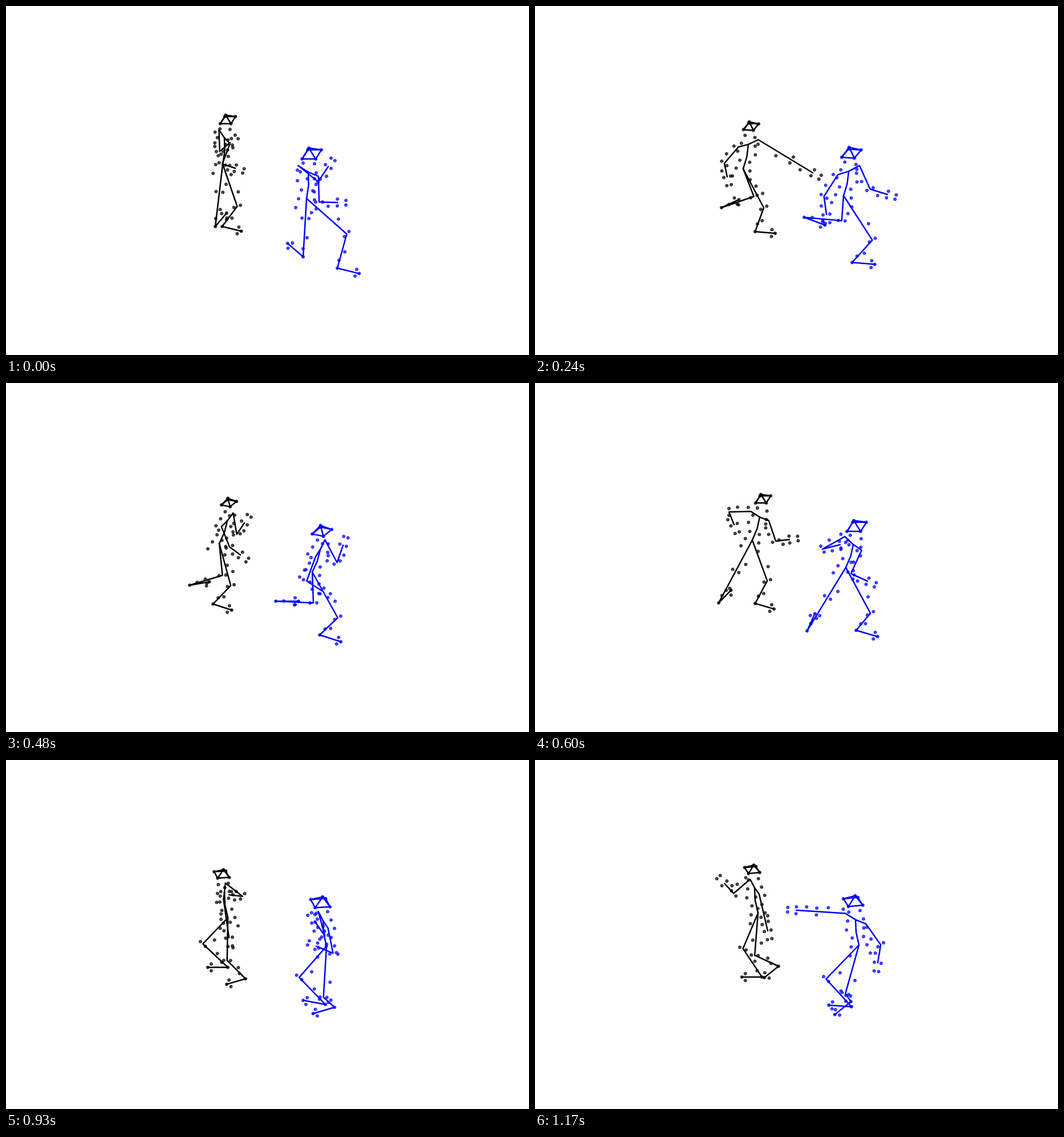
Animation of 917 by 611 pixels, one loop 1200 ms. Source, as an HTML page with a canvas:

```html
<!DOCTYPE html>
<html>
<head>
<meta charset="utf-8">
<title>Two moving skeletons</title>
<style>
html, body { margin: 0; width: 100%; height: 100%; overflow: hidden; background: #fefefe; }
canvas { display: block; }
</style>
</head>
<body>
<canvas id="stage" width="917" height="611"></canvas>
<script>
const ctx = document.getElementById('stage').getContext('2d');
const LOOP = 1200, STEP = 30;
const times = [0, 240, 480, 600, 780, 930, 1170];
const LAST = times.length - 1;

const clamp = (v, lo, hi) => Math.max(lo, Math.min(hi, v));
const mix = (a, b, u) => a + (b - a) * u;
const add = (p, x, y) => [p[0] + x, p[1] + y];
const polar = (p, degrees, rx, ry) => {
  const a = degrees * Math.PI / 180;
  return add(p, rx * Math.cos(a), ry * Math.sin(a));
};

// Smooth curve through one value per key time.
function curve(...v) {
  const slope = k => {
    const a = Math.max(k - 1, 0), b = Math.min(k + 1, LAST);
    return (v[b] - v[a]) / (times[b] - times[a]);
  };
  return t => {
    let k = 0;
    while (k < LAST - 1 && t >= times[k + 1]) k++;
    const span = times[k + 1] - times[k], u = (t - times[k]) / span;
    return mix(v[k], v[k + 1], u * u * (3 - 2 * u)) +
      span * u * (1 - u) * ((1 - u) * slope(k) - u * slope(k + 1));
  };
}

function path(...xy) {
  const x = curve(...xy.filter((_, i) => i % 2 === 0));
  const y = curve(...xy.filter((_, i) => i % 2));
  return t => [x(t), y(t)];
}

// Both bodies turn, lean and place the leading foot alike.
const face = curve(1, .8, .5, 1, -.9, -.8, -.7);
const lean = curve(3, 9, 14, 13, 2, -6, -6);
const leadFoot = curve(17, 6, 22, 20, -100, -200, -225);

// Limb lengths are seen lengths: [at the start, at the end].
const figures = [{
  color: '#000', size: .88, headSize: .78, arm: [38, 24],
  yaw: curve(60, 153, 122, 35, -35, -85, -114),
  pelvis: path(380,277, 365,285, 374,281, 381,275, 383,274, 389,276, 391,268),
  hands: [
    path(393,239, 487,292, 418,245, 349,248, 345,291, 391,311, 408,299),
    path(402,284, 337,299, 411,301, 446,274, 428,261, 391,236, 332,216)
  ],
  legs: [{
    thigh: [48, 68], shin: [60, 60], turn: 690,
    ankle: path(367,386, 327,353, 322,354, 322,385, 381,399, 389,363, 398,380),
    foot: curve(-56, -30, -12, -52, -168, -180, -180)
  }, {
    thigh: [78, 74], shin: [44, 46], turn: 780,
    ankle: path(379,386, 386,395, 363,387, 386,386, 421,376, 420,383, 427,361),
    foot: leadFoot
  }]
}, {
  color: '#00f', size: 1, headSize: 1, arm: [45, 32],
  yaw: curve(36, 150, 112, 48, -27, -113, -145),
  pelvis: path(527,337, 541,332, 537,331, 545,323, 543,324, 562,326, 568,324),
  hands: [
    path(565,281, 618,330, 591,284, 535,283, 508,311, 544,326, 601,355),
    path(581,344, 511,365, 554,364, 583,347, 580,304, 541,282, 458,263)
  ],
  legs: [{
    thigh: [34, 84], shin: [66, 66], turn: 690,
    ankle: path(521,439, 472,370, 473,382, 477,434, 563,450, 560,428, 555,432),
    foot: curve(-133, 25, 0, -70, -177, -167, -175)
  }, {
    thigh: [94, 88], shin: [62, 16], turn: 780,
    ankle: path(581,459, 556,449, 550,441, 563,433, 583,434, 576,433, 554,423),
    foot: leadFoot
  }]
}];

// Middle joint of a two-bone limb; side says which way it bends.
function joint(from, to, upper, lower, side) {
  const dx = to[0] - from[0], dy = to[1] - from[1], len = Math.hypot(dx, dy) || 1;
  const reach = clamp(len, Math.abs(upper - lower), upper + lower);
  const along = (reach * reach + upper * upper - lower * lower) / (2 * reach);
  const across = side * Math.sqrt(Math.max(0, upper * upper - along * along));
  const f = along * Math.max(1, len / reach) / len, g = across / len;
  return add(from, dx * f + dy * g, dy * f - dx * g);
}

function line(...points) {
  ctx.beginPath();
  points.forEach(p => ctx.lineTo(...p));
  ctx.stroke();
}

function dot([x, y]) {
  ctx.beginPath();
  ctx.arc(x, y, 2.6, 0, 2 * Math.PI);
  ctx.globalAlpha = .72;
  ctx.fill();
  ctx.lineWidth = .9;
  ctx.stroke();
  ctx.globalAlpha = 1;
}

// Dot beside a bone: fraction of its length, then pixels along and across.
function mark(a, b, fraction, along, across) {
  const dx = b[0] - a[0], dy = b[1] - a[1], len = Math.hypot(dx, dy) || 1;
  const f = fraction + along / len, g = across / len;
  dot(add(a, dx * f - dy * g, dy * f + dx * g));
}

function pose(fig, t) {
  const turned = turn => clamp((turn - t) / 90, -1, 1);
  const { size, headSize: h } = fig, k = face(t), tilt = lean(t);
  const pelvis = fig.pelvis(t);
  const neck = add(pelvis, tilt, -48 + .6 * Math.abs(tilt));
  const spine = add(pelvis, tilt / 2 + 2 * turned(690), (neck[1] - pelvis[1]) / 2);

  const center = add(neck, 6 * k, -31);
  const corner = (x, y) => add(center, x * h, y * h);
  const head = [corner(-17, 8 * k), corner(9 * k - 2, 8), corner(17, -8 * k), corner(2 - 9 * k, -8)];
  const crown = corner(-5 * k, -11);

  const arms = fig.hands.map((path, i) => {
    const shoulder = polar(add(neck, 0, -2), fig.yaw(t) + (i ? 0 : 180), 22 * size, 16 * size);
    const hand = path(t);
    return [shoulder, joint(shoulder, hand, ...fig.arm, -turned(690)), hand];
  });
  const legs = fig.legs.map(leg => {
    const ankle = leg.ankle(t), u = t / LOOP;
    const knee = joint(pelvis, ankle, mix(...leg.thigh, u), mix(...leg.shin, u), turned(leg.turn));
    return [knee, ankle, polar(ankle, leg.foot(t), 40 * size, 32 * size)];
  });
  return { neck, spine, pelvis, head, crown, arms, legs };
}

function drawFigure(fig, t) {
  const { neck, spine, pelvis, head, crown, arms, legs } = pose(fig, t);
  ctx.strokeStyle = ctx.fillStyle = fig.color;
  ctx.lineWidth = 2.5;
  line(...head, head[0]);
  head.forEach(p => line(crown, p));
  line(neck, spine, pelvis);
  arms.forEach(limb => line(neck, ...limb));
  legs.forEach(limb => line(pelvis, ...limb));

  [crown, ...head].forEach(dot);
  for (let row = 0; row < 6; row++) {
    for (const side of [-1, 1]) {
      mark(neck, pelvis, -.33 + .34 * row, 0, side * (10 + row % 3 * 4) * fig.size);
    }
  }
  for (const [shoulder, elbow, hand] of arms) {
    mark(shoulder, elbow, 0, 4, 7);
    mark(shoulder, elbow, .6, 0, 8);
    for (const side of [-1, 1]) {
      mark(shoulder, elbow, 1, 0, 6 * side);
      mark(elbow, hand, 1, 0, 6 * side);
      mark(elbow, hand, 1, 15, 4 * side);
    }
    mark(elbow, hand, .5, 0, 7);
  }
  for (const [knee, ankle, toe] of legs) {
    mark(pelvis, knee, .7, 0, -10);
    mark(knee, ankle, .5, 0, -5);
    mark(knee, ankle, 1, -14, 1);
    for (const side of [-1, 1]) {
      mark(pelvis, knee, 1, 0, 6 * side);
      mark(ankle, toe, 1, -6, 6 * side);
    }
    dot(ankle);
    dot(toe);
  }
}

ctx.lineJoin = ctx.lineCap = 'round';
const start = performance.now();

function frame() {
  const elapsed = Math.max(0, performance.now() - start) % LOOP;
  const t = Math.floor(elapsed / STEP) * STEP;
  ctx.clearRect(0, 0, 917, 611);
  figures.forEach(fig => drawFigure(fig, t));
  requestAnimationFrame(frame);
}
frame();
</script>
</body>
</html>
```
